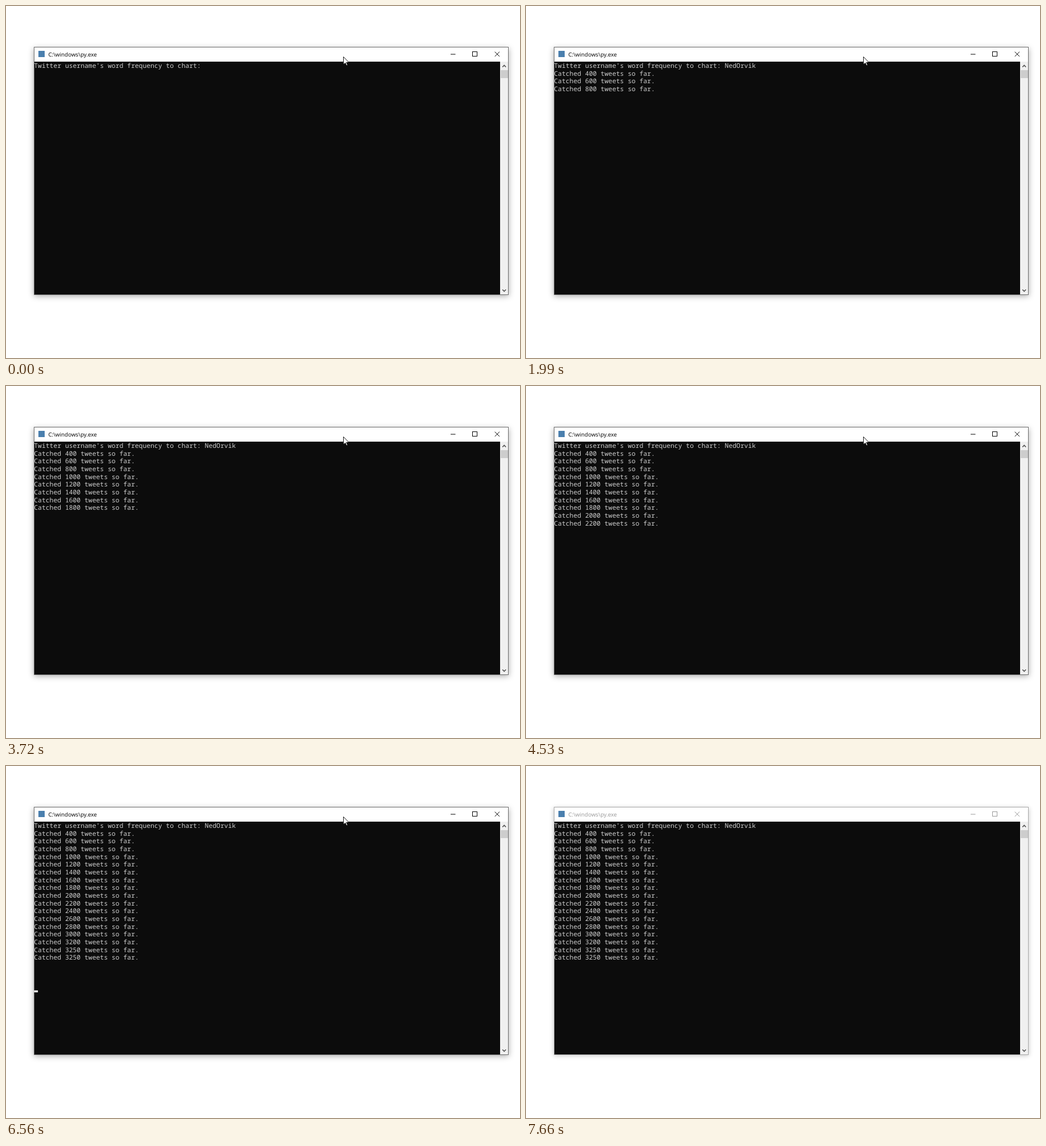
An HTML page for the animation above (8000 ms loop, 904 px wide and 620 px high).

```html
<!DOCTYPE html>
<html lang="en">
<head>
<meta charset="utf-8">
<title>Console</title>
<style>
  html, body { margin: 0; width: 100%; height: 100%; overflow: hidden; background: #fff; }
  svg { display: block; position: absolute; left: 0; top: 0; }
  text { text-rendering: geometricPrecision; }
  #shadow {
    position: absolute; left: 49px; top: 72px; width: 835px; height: 436px;
    box-shadow: 0 3px 10px rgba(0, 0, 0, .34);
  }
  #shadow.idle { box-shadow: 0 2px 8px rgba(0, 0, 0, .24); }
  #console text { font: 11.383px "Noto Sans Mono", monospace; fill: #ccc; }
  #title { font: 9.9px "Open Sans", sans-serif; fill: #000; }
  #buttons { fill: none; stroke: #000; }
  #frame { fill: #fff; stroke: #6c6c6c; }
  .idle #title { fill: #999; }
  .idle #buttons { stroke: #999; }
  .idle #frame { stroke: #a8a8a8; }
</style>
</head>
<body>
<div id="shadow"></div>
<svg id="stage" width="904" height="620" viewBox="0 0 904 620">
  <rect id="frame" x="49.5" y="72.5" width="834" height="436"/>
  <rect x="57" y="79" width="11" height="11" fill="#4a7fae"/>
  <text id="title" x="74.4" y="88.8">C:\windows\py.exe</text>
  <g id="buttons">
    <path d="M782 85H790.5"/>
    <rect x="820.5" y="80.5" width="8" height="8"/>
    <path d="M859.7 80.6L868 88.9M868 80.6L859.7 88.9"/>
  </g>
  <rect x="50" y="98" width="819" height="410" fill="#0c0c0c"/>
  <rect x="869" y="98" width="14" height="410" fill="#f0f0f0"/>
  <rect x="870" y="113" width="13" height="14" fill="#cdcdcd"/>
  <path d="M873.2 107.6L876.2 104.4L879.2 107.6M873.2 499.4L876.2 502.6L879.2 499.4"
        fill="none" stroke="#505050" stroke-width="1.5"/>
  <g id="console"></g>
  <rect id="caret" width="6.83" height="3.4" fill="#f2f2f2"/>
  <path id="mouse" d="M.5 .5V14.2L3.6 11.2L5.9 16L7.8 15.2L5.6 10.3H10Z"
        fill="#fff" stroke="#000" stroke-width=".9"/>
</svg>
<script>
  const LOOP = 8000, LEFT = 49.3, TOP = 98, COL = 6.83, ROW = 13.66;
  const PROMPT = "Twitter username's word frequency to chart: ";
  const NAME = "NedOrvik";
  const TYPE_START = 80, KEY = 50, ENTER = 480;
  const LINE_TIMES = [1330, 1640, 1990, 2340, 2690, 3040, 3370, 3720, 4110,
                      4530, 4870, 5180, 5570, 5870, 6270, 6440, 6560];
  const CARET_ON = [[80, 740], [950, 1170], [1330, 1640], [2560, 3250],
                    [3950, 4410], [4830, 5530], [6230, 6950]];
  const BLUR = 7130, SHADOW_BLUR = 7170;
  const MOVE_START = 7460, MOVE_STEP = 40, MOVE_COUNT = 5;

  const get = id => document.getElementById(id);
  const stage = get("stage"), shadow = get("shadow"), caret = get("caret"), mouse = get("mouse");
  const show = (el, on) => el.setAttribute("visibility", on ? "visible" : "hidden");

  function addLine(row, content) {
    const el = document.createElementNS("http://www.w3.org/2000/svg", "text");
    el.setAttribute("x", LEFT);
    el.setAttribute("y", TOP + 11 + row * ROW);
    el.textContent = content;
    get("console").append(el);
    return el;
  }

  const prompt = addLine(0, PROMPT);
  const lines = LINE_TIMES.map((_, i) =>
    addLine(i + 1, `Catched ${Math.min(400 + 200 * i, 3250)} tweets so far.`));

  function drawConsole(t) {
    const typed = t < TYPE_START ? 0
      : Math.min(NAME.length, Math.floor((t - TYPE_START) / KEY) + 1);
    prompt.textContent = PROMPT + NAME.slice(0, typed);
    const count = LINE_TIMES.filter(at => t >= at).length;
    lines.forEach((el, i) => show(el, i < count));

    const row = t < ENTER ? 0 : count === lines.length ? 21 : count + 1;
    const col = row ? 0 : PROMPT.length + typed;
    caret.setAttribute("x", LEFT + col * COL);
    caret.setAttribute("y", TOP + (row + 1) * ROW - 3.3);
    show(caret, CARET_ON.some(([on, off]) => t >= on && t < off));
  }

  // The pointer speeds up and leaves through the bottom edge.
  function drawMouse(t) {
    const step = Math.max(0, Math.floor((t - MOVE_START) / MOVE_STEP) + 1);
    const p = (step / MOVE_COUNT) ** 2;
    mouse.setAttribute("transform", `translate(${593 - 33 * p} ${89 + 489 * p})`);
    show(mouse, step <= MOVE_COUNT);
  }

  function draw() {
    const t = performance.now() % LOOP;
    drawConsole(t);
    drawMouse(t);
    stage.classList.toggle("idle", t >= BLUR);
    shadow.classList.toggle("idle", t >= SHADOW_BLUR);
    requestAnimationFrame(draw);
  }
  draw();
</script>
</body>
</html>
```
